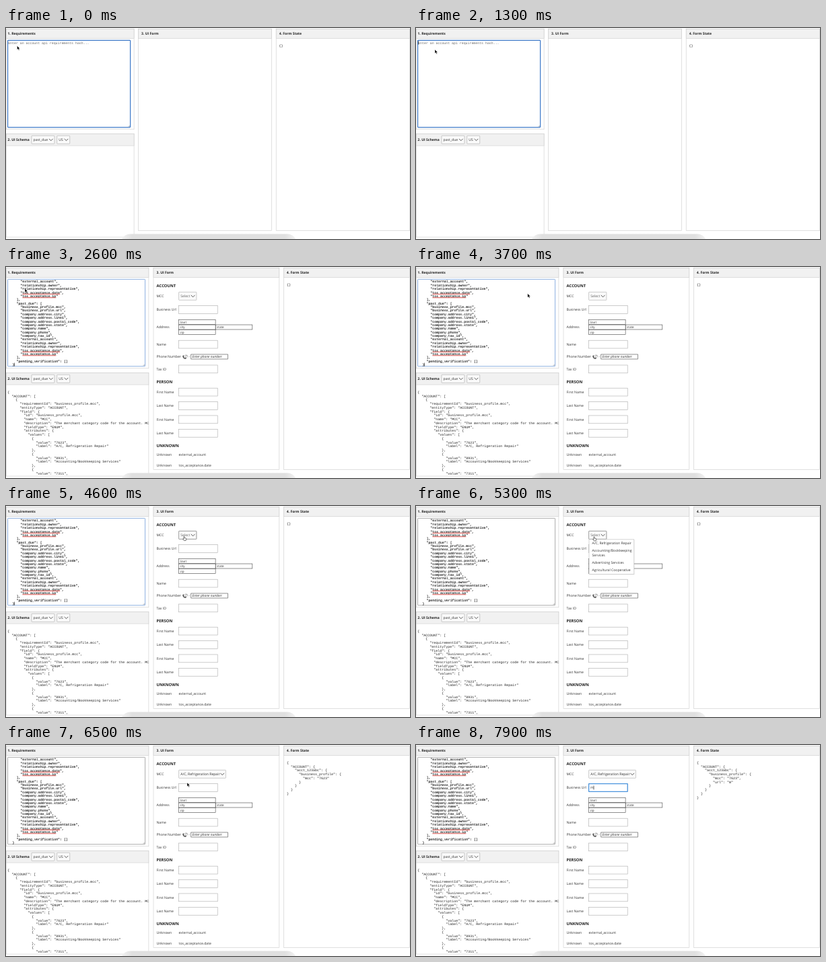
These frames come from a looping animation (600x314 px, 8000 ms). An HTML page:

```html
<!DOCTYPE html>
<html lang="en">
<head>
<meta charset="utf-8">
<title>Requirements form</title>
<style>
  html, body { margin: 0; width: 100%; height: 100%; overflow: hidden; background: #fff; }
  svg { display: block; width: 100vw; height: 100vh; }
  text { font: 5.1px "Open Sans", "Noto Sans", sans-serif; fill: #333; white-space: pre; text-rendering: geometricPrecision; }
  .title { font-weight: 700; font-size: 5.05px; fill: #222; }
  .section { font-weight: 700; font-size: 5.95px; fill: #222; }
  .code { font: 5px "Liberation Mono", monospace; fill: #222; }
  .area { font: 4.9px "Liberation Mono", monospace; fill: #111; stroke: #111; stroke-width: 0.1px; }
  .hint { fill: #666; stroke: none; }
  .small { font-size: 4.6px; fill: #333; }
  .tilt { font-size: 4.85px; font-style: italic; fill: #222; }
</style>
</head>
<body>
<svg id="stage" viewBox="0 0 600 314" preserveAspectRatio="none"></svg>
<script>
const LOOP = 8000;
const FILL = 1600, MISSPELL = 2500, BLUR = 4700, OPEN = 4900, PICK = 6100, FOCUS_URL = 7000, TYPE = 7700;

const escapeText = s => s.replace(/&/g, '&amp;').replace(/</g, '&lt;');
// y is the vertical middle of the line
const text = (s, x, y, cls = '') => `<text class="${cls}" x="${x}" y="${y + 1.8}">${escapeText(s)}</text>`;
const mono = (lines, x, y, pitch, cls) => lines.map((s, i) => text(s, x, y + i * pitch - 0.3, cls)).join('');
const rect = (x, y, w, h, fill = '#fff', stroke = '#bbb', line = 0.6, r = 0) =>
  `<rect x="${x}" y="${y}" width="${w}" height="${h}" rx="${r}" fill="${fill}" stroke="${stroke}" stroke-width="${line}"/>`;
const path = (d, stroke, line, fill = 'none') =>
  `<path d="${d}" stroke="${stroke}" stroke-width="${line}" fill="${fill}"/>`;
const group = (id, content) => `<g id="${id}">${content}</g>`;

const panel = (x, y, w, h, head, title) =>
  rect(x, y, w, h, '#fff', '#ccc') + rect(x, y, w, head, '#f1f1f1', '#ccc') +
  text(title, x + 4.5 - (x < 1 ? 2.2 : 0), y + head / 2 + 0.2, 'title');

const select = (x, y, w, label, cls = '') =>
  rect(x, y, w, 12, '#fafafa', '#aaa', 0.6, 0.6) + text(label, x + 2.6, y + 6, cls) +
  path(`M${x + w - 8} ${y + 4.6}l2.8 2.8 2.8-2.8`, '#333', 0.8);

const panels = (leftW, formX, formW, stateX) =>
  panel(0.3, 1.3, leftW, 149.5, 14.2, '1. Requirements') +
  panel(0.3, 157.3, leftW, 153.8, 17.8, '2. UI Schema') +
  select(38, 160.3, 34, 'past_due') + select(75.7, 160.3, 19, 'US') +
  panel(formX, 1.3, formW, 300, 14.2, '3. UI Form') +
  panel(stateX, 1.3, 599.7 - stateX, 300, 14.2, '4. Form State');

const textarea = (w, stroke, line) =>
  rect(2.6, 18.3, w, 129.5, '#fff', stroke, line, 0.8) +
  path(`M${w - 0.4} 147l2.2-2.2M${w + 0.9} 147l.9-.9`, '#777', 0.5);

const required = ['business_profile.mcc', 'business_profile.url', 'company.address.city', 'company.address.line1',
  'company.address.postal_code', 'company.address.state', 'company.name', 'company.phone', 'company.tax_id',
  'external_account', 'relationship.owner', 'relationship.representative', 'tos_acceptance.date', 'tos_acceptance.ip'];
const toLines = value => JSON.stringify(value, null, 2).split('\n');
const requirementLines = toLines({ currently_due: required, past_due: required, pending_verification: [] }).slice(-24);
const AREA_PITCH = 5.38, AREA_CHAR = 2.94;

const schemaLines = toLines({ ACCOUNT: [{
  requirementId: 'business_profile.mcc',
  entityType: 'ACCOUNT',
  field: {
    id: 'business_profile.mcc',
    name: 'MCC',
    description: 'The merchant category code for the account. MCC',
    fieldType: 'ENUM',
    attributes: { values: [
      { value: '7623', label: 'A/C, Refrigeration Repair' },
      { value: '8931', label: 'Accounting/Bookkeeping Services' },
      { value: '7311', label: 'Advertising Services' }
    ] }
  }
}] }).slice(0, 22);

const stateCode = profile => mono(
  profile ? toLines({ ACCOUNT: { acct_123abc: { business_profile: profile } } }) : ['{}'], 417, 26.3, 5.75, 'code');

const LABEL_X = 223.5, FIELD_X = 256.6;
const row = (label, y) => text(label, LABEL_X, y) + rect(FIELD_X, y - 6, 57.6, 11.8, '#fff', '#aaa');
const smallField = (label, x, y, cls = 'small') => rect(x, y, 54.5, 7, '#fff', '#444', 0.6) + text(label, x + 1.8, y + 3.3, cls);

const form =
  text('ACCOUNT', LABEL_X, 27.8, 'section') + text('MCC', LABEL_X, 43.3) +
  row('Business Url', 63.6) +
  text('Address', LABEL_X, 89.5) +
  smallField('line1', FIELD_X, 78.5) + smallField('city', FIELD_X, 86) +
  smallField('state', 311.3, 86) + smallField('zip', FIELD_X, 93.5) +
  row('Name', 115.2) +
  text('Phone Number', LABEL_X, 133.5) +
  path('M262.6 132.1q1.1-1.2 1.8.4l-.5 1q.7 1.5 2 1.9l.9-.7q1.6.5.6 1.7q-2.4 1.2-4.2-1.3q-1.1-1.8-.6-3z', '#444', 0.3, '#555') +
  path('M265.6 131.3h3.4v3M265.6 132.6l2 2', '#555', 0.6) +
  text('-', 271.2, 133.5) + smallField('Enter phone number', 274.8, 130, 'tilt') +
  row('Tax ID', 152) +
  text('PERSON', LABEL_X, 170.7, 'section') +
  [0, 1, 2, 3].map(i => row(i % 2 ? 'Last Name' : 'First Name', 186.2 + i * 20.4)).join('') +
  text('UNKNOWN', LABEL_X, 266.3, 'section') +
  ['external_account', 'tos_acceptance.date'].map((s, i) =>
    text('Unknown', LABEL_X, 279.6 + i * 15.5) + text(s, FIELD_X, 279.6 + i * 15.5)).join('');

const underline = [3, 4, 19, 20].map(i =>
  path(`M24.4 ${24.2 + i * AREA_PITCH}h${(i % 2 ? 19 : 17) * AREA_CHAR}`, '#e8605a', 1)).join('');

const menuItems = [['A/C, Refrigeration Repair', 55.6], ['Accounting/Bookkeeping', 66.6], ['Services', 73.2],
  ['Advertising Services', 84.6], ['Agricultural Cooperative', 95.6]];
const menu = rect(257.6, 50.4, 67, 52, '#0001', 'none') + rect(257, 49.8, 66.8, 51.6, '#fff', '#bbb') +
  menuItems.map(([s, y]) => text(s, 261.5, y)).join('');

const arrow = path('M0 0V5.8L1.4 4.6 2.4 6.7 3.4 6.2 2.4 4.2H4.2Z', '#fff', 0.4, '#000');
const hand = path('M-.5 .5Q0-.3.5.5V2.4L2.9 3Q3.4 3.2 3.2 4.2L2.7 6.4H-.2L-1.8 4Q-1.6 3.2-.5 4Z', '#222', 0.6, '#fff');
const caret = (x, y, h) => path(`M${x} ${y}v${h}`, '#000', 0.6);

document.getElementById('stage').innerHTML =
  `<defs>
    <clipPath id="schemaClip"><rect y="175" width="211.8" height="135.8"/></clipPath>
    <linearGradient id="bar"><stop offset="0" stop-color="#f2f2f2"/><stop offset=".06" stop-color="#e0e0e0"/>
      <stop offset=".94" stop-color="#e0e0e0"/><stop offset="1" stop-color="#f2f2f2"/></linearGradient>
  </defs>` +
  group('before',
    panels(189.8, 196.6, 198, 401.2) + textarea(182, '#3c78c8', 1.2) +
    text('Enter an account api requirements hash...', 3.2, 21.8, 'area hint') +
    mono(['{}'], 405.6, 26.3, 0, 'code')) +
  group('after',
    panels(211.6, 219, 186.8, 412.3) +
    group('areaFocused', textarea(204, '#7fa8de', 0.9)) + group('areaPlain', textarea(204, '#888', 0.7)) +
    mono(requirementLines, 9.6, 21.9, AREA_PITCH, 'area') + group('spelling', underline) +
    `<g clip-path="url(#schemaClip)">${mono(schemaLines, 2.2, 186.3, 5.76, 'code')}</g>` + form +
    group('mccEmpty', select(FIELD_X, 37.3, 26.3, 'Select', 'hint')) +
    group('mccHover', rect(FIELD_X, 37.3, 26.3, 12, 'none', '#888', 0.6, 0.6)) +
    group('mccChosen', select(FIELD_X, 37.3, 69.8, 'A/C, Refrigeration Repair')) +
    group('urlFocus', rect(FIELD_X, 57.6, 57.6, 11.8, '#fff', '#4a94dd', 1.3, 0.6)) +
    group('urlText', text('m', 259, 63.6)) +
    group('stateEmpty', stateCode()) + group('stateMcc', stateCode({ mcc: '7623' })) +
    group('stateUrl', stateCode({ mcc: '7623', url: 'm' })) +
    group('menu', menu)) +
  `<path d="M172 314Q176 306.5 185 306.5H418Q426 306.5 430 314Z" fill="url(#bar)"/>` +
  group('caretStart', caret(3.6, 19.3, 5.4)) + group('caretArea', caret(12.5, 142.6, 5.2)) +
  group('caretUrl', caret(259, 60.5, 6)) + group('caretTyped', caret(264, 60.5, 6)) +
  group('pointer', group('arrow', arrow) + group('hand', hand));

const nodes = Object.fromEntries([...document.querySelectorAll('g[id]')].map(g => [g.id, g]));
const show = (id, on) => { nodes[id].style.display = on ? '' : 'none'; };

// time, x, y of the pointer's tip
const route = [[0, 16.5, 26.5], [200, 16.5, 26.5], [800, 28, 32], [3200, 28, 32], [4000, 229, 43], [4600, 264.5, 45],
  [5300, 264.5, 45.5], [5700, 266.5, 54], [6100, 266.5, 54], [6500, 269, 56], [6900, 273, 62], [LOOP, 273, 62]];

function pointerAt(t) {
  const i = route.findIndex(point => point[0] > t);
  const [t0, x0, y0] = route[i - 1], [t1, x1, y1] = route[i];
  const p = (t - t0) / (t1 - t0), e = p * p * (3 - 2 * p);
  return [x0 + (x1 - x0) * e, y0 + (y1 - y0) * e];
}

function draw(t) {
  const filled = t >= FILL, picked = t >= PICK, typed = t >= TYPE;
  const blink = start => (t - start + LOOP) % 1000 < 500;
  show('before', !filled);
  show('after', filled);
  show('areaFocused', t < BLUR);
  show('areaPlain', t >= BLUR);
  show('spelling', t >= MISSPELL);
  show('mccEmpty', !picked);
  show('mccHover', t >= 4500 && !picked);
  show('mccChosen', picked);
  show('menu', t >= OPEN && !picked);
  show('urlFocus', t >= FOCUS_URL);
  show('urlText', typed);
  show('stateEmpty', !picked);
  show('stateMcc', picked && !typed);
  show('stateUrl', typed);
  show('caretStart', !filled && blink(300));
  show('caretArea', filled && t < BLUR && blink(FILL));
  show('caretUrl', t >= FOCUS_URL && !typed && blink(FOCUS_URL));
  show('caretTyped', typed);
  const overSelect = t >= 4500 && t < 6200;
  show('pointer', !typed);
  show('arrow', !overSelect);
  show('hand', overSelect);
  nodes.pointer.setAttribute('transform', `translate(${pointerAt(t)})`);
}

const start = performance.now();
function tick() {
  draw((performance.now() - start) % LOOP);
  requestAnimationFrame(tick);
}
tick();
</script>
</body>
</html>
```
